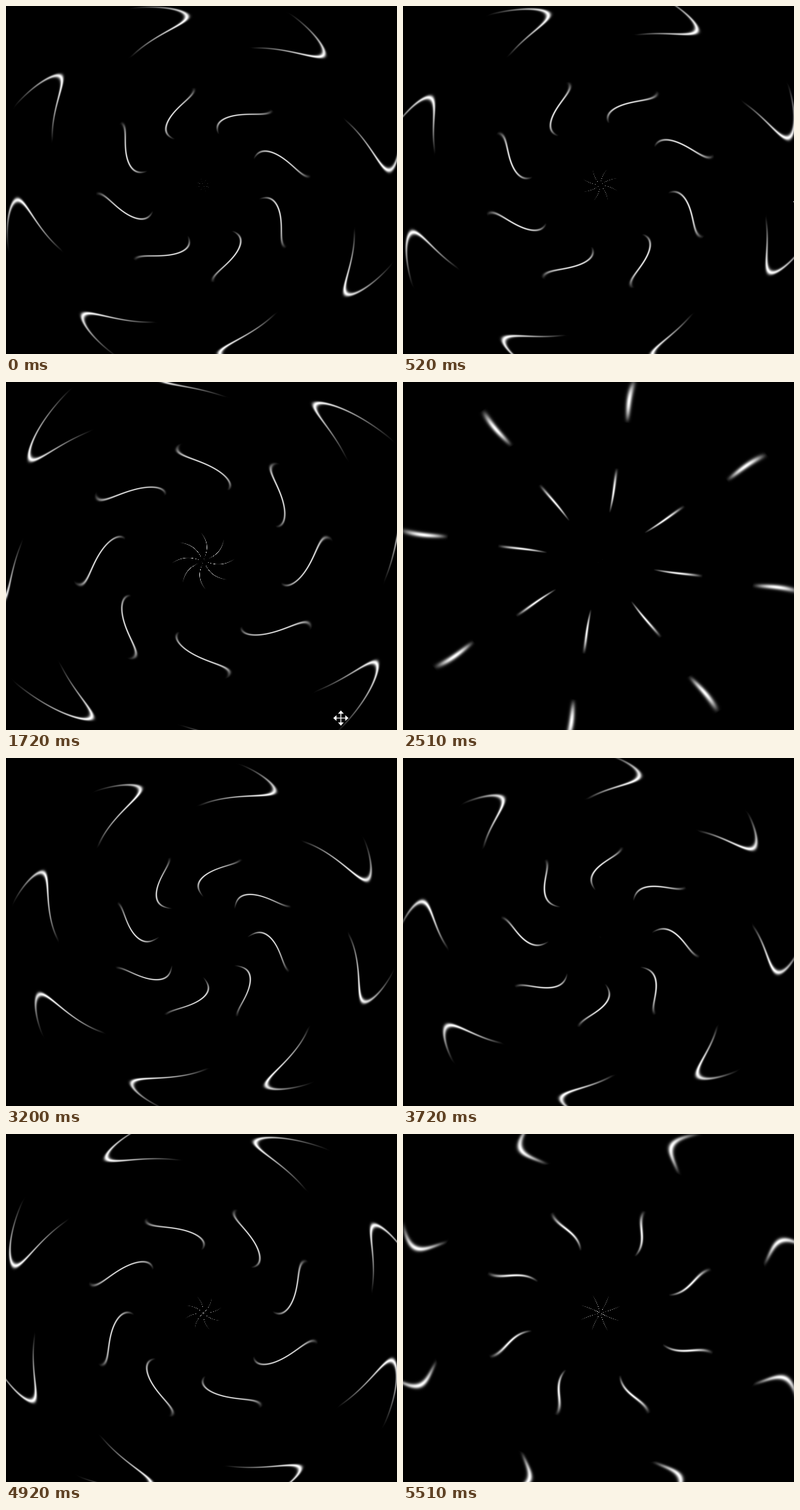
Animation, 540 px wide and 481 px high, one loop 5580 ms. Source, as an HTML page with a canvas:

```html
<!DOCTYPE html>
<html lang="en">
<head>
<meta charset="utf-8">
<title>Swirl</title>
<style>
  html, body { margin: 0; width: 100%; height: 100%; overflow: hidden; background: #000; }
  canvas { display: block; }
</style>
</head>
<body>
<canvas id="stage" width="540" height="481"></canvas>
<script>
const W = 540, H = 481, CX = 272, CY = 247, ASPECT = 1.101;
const LOOP = 5580, STEP = 66.4, LAST = 83;
const TICK = 0.06707; // field seconds per step
const ARMS = 8, TAU = Math.PI * 2, SIGMA = 0.085;

const ctx = document.getElementById('stage').getContext('2d');
const image = ctx.createImageData(W, H);
const pixels = new Uint32Array(image.data.buffer);

// polar coordinates of every pixel, slightly stretched sideways
const radius = new Float32Array(W * H);
const angle = new Float32Array(W * H);
for (let y = 0, i = 0; y < H; y++) {
  for (let x = 0; x < W; x++, i++) {
    const dx = (x - CX) / ASPECT, dy = y - CY;
    radius[i] = Math.hypot(dx, dy);
    angle[i] = ARMS * Math.atan2(dy, dx);
  }
}

// ring phase over time: [seconds, radians]
const keys = [
  [0, -1.08], [1.14, 0.18], [1.744, 0.40], [2.549, -1.33],
  [3.219, -1.95], [4.36, -0.62], [5.567, -0.25]
];

function slope(i) {
  const rate = (a, b) => (b[1] - a[1]) / (b[0] - a[0]);
  if (i === 0) return rate(keys[0], keys[1]);
  if (i === keys.length - 1) return rate(keys[i - 1], keys[i]);
  const before = keys[i][0] - keys[i - 1][0], after = keys[i + 1][0] - keys[i][0];
  return (rate(keys[i - 1], keys[i]) * after + rate(keys[i], keys[i + 1]) * before) / (before + after);
}

function ringPhase(s) {
  let i = 0;
  while (i < keys.length - 2 && s > keys[i + 1][0]) i++;
  const [t0, a] = keys[i], [t1, b] = keys[i + 1];
  const d = t1 - t0, u = (s - t0) / d, v = 1 - u;
  return v * v * ((1 + 2 * u) * a + u * d * slope(i))
       + u * u * ((1 + 2 * v) * b - v * d * slope(i + 1));
}

function drawField(s, phase) {
  const turn = 2.57 - s - phase;
  const swirl = 2.1 * Math.cos(2 * s - 3.556);
  for (let i = 0; i < pixels.length; i++) {
    const r = radius[i], ring = Math.cos(r / 20 - phase);
    let level = 0;
    if (ring > 0) {
      let p = angle[i] - turn - swirl * Math.cos(r / 16 - phase);
      p -= TAU * Math.round(p / TAU);
      if (Math.abs(p) < 0.4) {
        level = Math.round(255 * ring * Math.exp(-p * p / (2 * SIGMA * SIGMA)));
      }
    }
    pixels[i] = 0xff000000 | level * 0x010101;
  }
  ctx.putImageData(image, 0, 0);
}

function drawCursor(x, y) {
  ctx.save();
  ctx.translate(Math.round(x) + 0.5, Math.round(y) + 0.5);
  ctx.fillStyle = '#fff';
  for (let k = 0; k < 4; k++) {
    ctx.beginPath();
    ctx.moveTo(0, -10.5);
    ctx.lineTo(4, -6);
    ctx.lineTo(0.6, -6);
    ctx.lineTo(0.6, 0);
    ctx.lineTo(-0.6, 0);
    ctx.lineTo(-0.6, -6);
    ctx.lineTo(-4, -6);
    ctx.fill();
    ctx.rotate(Math.PI / 2);
  }
  ctx.restore();
}

let shown = -1;
const start = performance.now();

function render(now) {
  const t = Math.max(0, now - start) % LOOP;
  const n = Math.min(LAST, Math.floor((t + 14) / STEP));
  if (n !== shown) {
    shown = n;
    const s = n * TICK, phase = ringPhase(s);
    drawField(s, phase);
    // the pointer steers the phase; it leaves the stage on the right
    const x = 446.5 + 136 * (s - 1.404) ** 2;
    if (x < W + 12) drawCursor(x, 412 + (phase - 0.18) * 236);
  }
  requestAnimationFrame(render);
}
render(start);
</script>
</body>
</html>
```
